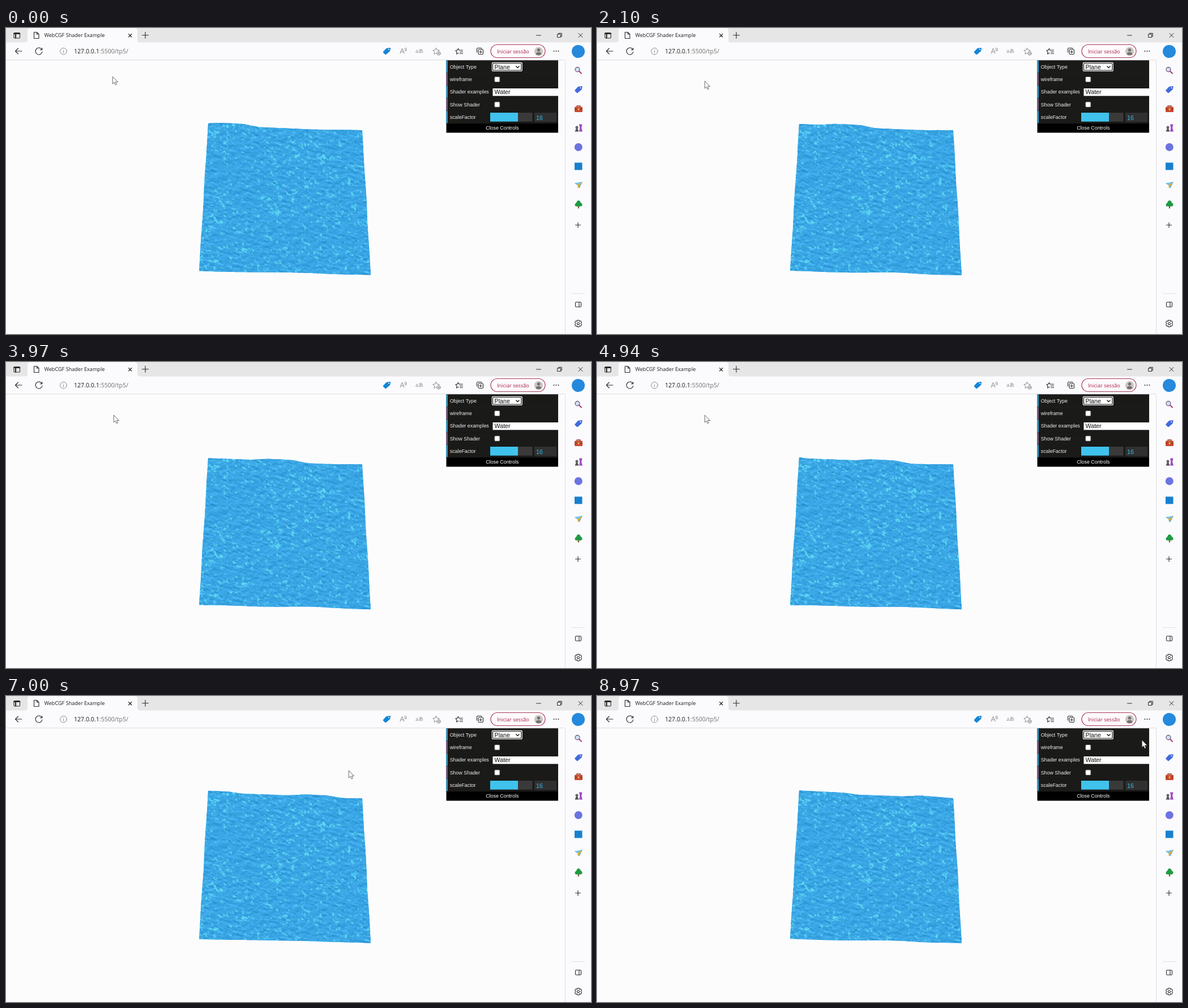
Write an HTML page with a canvas that moves like this. It is 1033 px wide and 542 px high and loops after 9000 ms.

```html
<!DOCTYPE html>
<html lang="en">
<head>
<meta charset="utf-8">
<title>WebCGF Shader Example</title>
<style>
html, body { margin: 0; width: 100%; height: 100%; overflow: hidden; background: #fcfcfd; }
canvas { position: absolute; left: 330px; top: 155px; }
svg { position: absolute; left: 0; top: 0; }
.ui { font: 9.1px "Open Sans", "Noto Sans", sans-serif; fill: #1c1c1c; }
.gui { font: 8.9px "Liberation Sans", Arial, sans-serif; fill: #eee; }
.field { font-size: 10.7px; fill: #111; }
.line { fill: none; stroke: #2b2b2b; stroke-width: 1.1; stroke-linecap: round; stroke-linejoin: round; }
.soft { stroke: #8a8a8a; stroke-width: 1; }
</style>
</head>
<body>
<canvas id="water" width="325" height="295"></canvas>
<svg width="1033" height="542" viewBox="0 0 1033 542">
  <!-- tab strip -->
  <rect width="1033" height="26" fill="#e6e6e7"/>
  <path d="M33 26Q38 26 38 21V5Q38 0 43 0H227Q232 0 232 5V21Q232 26 237 26Z" fill="#fbfbfd"/>
  <rect y="25.5" width="1033" height="31.5" fill="#fbfbfd"/>
  <path d="M0 56.7H987" stroke="#dcdce0"/>
  <g class="line">
    <rect x="14" y="8.5" width="10.5" height="9.5" rx="1.5"/>
    <path d="M14 10H24.5M17 10.5V17.5" stroke-width="2"/>
    <path d="M49.5 7.5H54.5L58 11V18.5H49.5ZM54.5 7.5V11H58"/>
    <path d="M216.5 10.5L222 16M222 10.5L216.5 16M240.5 12.7H251.5M246 7.2V18.2"/>
    <path d="M936.5 13H944.5M1011 9.5L1018 16.5M1018 9.5L1011 16.5" stroke-width="1"/>
    <path d="M974 11H979.5V16.5H974ZM975.5 11V9.3H981.3V15H979.5" stroke-width="1"/>
    <path d="M28 41H16.5M21.5 36L16.5 41L21.5 46"/>
    <path d="M63.5 38.5A6 6 0 1 0 64 42M63.8 35.5V38.8H60.4"/>
  </g>
  <g class="line soft">
    <circle cx="101.5" cy="41.2" r="5.8"/>
    <path d="M101.5 40.5V44M101.5 38.3V38.4"/>
    <path d="M696 45L699.5 36L703 45M697.2 42H701.8M704 36Q706 38 704.5 40.5M706 35Q708.5 38 706.5 41"/>
    <path d="M759.5 35.5L761.3 39L765.2 39.6L762.4 42.4L763 46.3L759.5 44.5L756 46.3L756.6 42.4L753.8 39.6L757.7 39Z"/>
    <circle cx="764" cy="45" r="3.2" fill="#fbfbfd"/>
    <path d="M762.5 45H765.5M764 43.5V46.5"/>
  </g>
  <text class="ui" x="723" y="44" style="fill:#888">aあ</text>
  <g class="line">
    <path d="M798.5 36.5L796.8 39.4L793.8 40L796 42.4L795.5 46L799 44.3M798.5 36.5L800 39.2H806.5M801.5 42.3H806.5M801.5 45.2H806.5"/>
    <path d="M831.5 43V37Q831.5 35.5 833 35.5H838.5Q840 35.5 840 37"/>
    <rect x="834" y="38" width="8.5" height="8.5" rx="1.5"/>
    <path d="M836 42.2H840.5M838.2 40V44.5"/>
  </g>
  <g fill="#333"><circle cx="967.5" cy="41" r="1"/><circle cx="971.5" cy="41" r="1"/><circle cx="975.5" cy="41" r="1"/></g>
  <g id="tag"><path d="M666 42L671.5 36L678 35Q679.5 35 679 37L678 41L671 47Q670 47.5 669 46.5L666 43.5Z" fill="#1485d8"/><circle cx="676" cy="38" r="1" fill="#fff"/></g>
  <rect x="856" y="29.5" width="96" height="23" rx="11.5" fill="#fffafc" stroke="#a63a58" stroke-width="1.2"/>
  <circle cx="940.5" cy="41.5" r="7.7" fill="#c9c6c3"/>
  <circle cx="940.5" cy="39" r="2.7" fill="#77716d"/><path d="M935.5 46.5Q936 42.8 940.5 42.8T945.5 46.5Q940.5 50 935.5 46.5Z" fill="#77716d"/>
  <g class="ui">
    <text x="67.5" y="16.4">WebCGF Shader Example</text>
    <text x="120" y="45" style="font-size:10.6px">127.0.0.1<tspan fill="#707070">:5500/tp5/</tspan></text>
    <text x="867" y="44.5" style="fill:#a3224a">Iniciar sessão</text>
  </g>
  <!-- side bar -->
  <rect x="987" y="57" width="46" height="485" fill="#fbfbfd"/>
  <path d="M987.5 57V542M999 470.5H1022" stroke="#dfdfe3"/>
  <circle cx="1010.5" cy="41.5" r="11.5" fill="#2589dc"/>
  <circle cx="1009" cy="73.5" r="4" fill="#cfe3f3" stroke="#775a83" stroke-width="1.3"/>
  <path d="M1012 76.5L1016 80.5" stroke="#a83c72" stroke-width="2" stroke-linecap="round"/>
  <g transform="translate(338.5 68)"><path d="M666 42L671.5 36L678 35Q679.5 35 679 37L678 41L671 47Q670 47.5 669 46.5L666 43.5Z" fill="#416bdc"/><circle cx="676" cy="38" r="1" fill="#fff"/></g>
  <path d="M1008 140V138H1014V140" fill="none" stroke="#8d3928" stroke-width="1.3"/>
  <rect x="1004" y="139.5" width="14" height="9.5" rx="1.5" fill="#c74b31"/><path d="M1004 144H1018" stroke="#812c22"/><rect x="1009.5" y="142.5" width="3" height="3" fill="#efb457"/>
  <path d="M1004.5 183.5L1006.8 178H1009.2L1011.5 183.5Z" fill="#555"/><circle cx="1008" cy="176" r="2.5" fill="#666"/>
  <path d="M1012 183.5L1013.3 177L1012 170.5H1017.5L1016.2 177L1018 183.5Z" fill="#a04cc4"/>
  <circle cx="1010.8" cy="211" r="7" fill="#6d73df"/>
  <rect x="1004" y="238.5" width="13.5" height="13" fill="#1880ce"/>
  <path d="M1004 275L1018 272.5L1012 284L1010 279Z" fill="#2f9be3"/><path d="M1004 275L1018 272.5L1009 278Z" fill="#72c8f5"/><path d="M1009 278L1018 272.5L1010 284Z" fill="#e8ad36"/>
  <rect x="1009.8" y="314" width="2.4" height="5.5" fill="#8b5a35"/><path d="M1011 305.5Q1014 305.5 1014.5 309Q1018 311 1017.5 314Q1017 316 1014 316H1008Q1004.5 316 1004.5 313.5Q1004.5 311 1007.5 309Q1008 305.5 1011 305.5Z" fill="#1f9a45"/>
  <g class="line">
    <path d="M1005.5 349H1014.5M1010 344.5V353.5"/>
    <rect x="1005.5" y="485.5" width="10" height="8.5" rx="1.5"/><path d="M1012 485.5V494"/>
    <circle cx="1010.5" cy="523.5" r="2"/>
    <path d="M1009 517.5H1012L1012.6 519.5L1014.8 518.8L1016.5 521.5L1015 523.5L1016.5 525.5L1014.8 528.2L1012.6 527.5L1012 529.5H1009L1008.4 527.5L1006.2 528.2L1004.5 525.5L1006 523.5L1004.5 521.5L1006.2 518.8L1008.4 519.5Z"/>
  </g>
  <!-- control panel -->
  <rect x="777.5" y="57.5" width="197.5" height="128" fill="#000"/>
  <g id="rows" class="gui"></g>
  <g class="gui">
    <rect x="857.8" y="60.8" width="54" height="16" rx="2" fill="#fff"/>
    <rect x="859.5" y="62.5" width="50.5" height="12.5" rx="1" fill="#fff" stroke="#111" stroke-width="1.2"/>
    <text class="field" x="862.5" y="72.7">Plane</text>
    <path d="M900.5 67.5L903.5 70.5L906.5 67.5" fill="none" stroke="#111" stroke-width="1.3"/>
    <rect x="859.5" y="107" width="115.5" height="13.3" fill="#fff"/>
    <text class="field" x="862.5" y="117.3">Water</text>
    <g fill="#fff" stroke="#777" stroke-width=".8"><rect x="862.8" y="86.5" width="9" height="9" rx="1.5"/><rect x="862.8" y="131" width="9" height="9" rx="1.5"/></g>
    <rect x="855" y="150" width="74.5" height="15.7" fill="#3a3a3a"/>
    <rect x="855" y="150" width="49" height="15.7" fill="#3fc3ed"/>
    <rect x="933" y="150" width="39" height="16.5" fill="#303030"/>
    <text class="field" x="936" y="162.7" style="fill:#3db9e2">16</text>
    <text x="847.2" y="180.2" style="fill:#fff">Close Controls</text>
  </g>
  <path id="cursor" d="M.3 0V13L3.2 10.3L5.2 14.8L7.3 13.9L5.4 9.6H9.5Z" fill="#fff" stroke="#444" stroke-width=".8"/>
</svg>
<script>
const LOOP = 9000, LEFT = 330, TOP = 155;
const canvas = document.getElementById('water'), ctx = canvas.getContext('2d');
const cursor = document.getElementById('cursor');
const mix = (a, b, k) => a + (b - a) * k;
const smooth = (a, b, x) => { const k = Math.min(1, Math.max(0, (x - a) / (b - a))); return k * k * (3 - 2 * k); };

// Eased value of column c at position p in a list of stops
function track(stops, p, c = 1) {
  const i = stops.findIndex(s => s[0] > p);
  if (i < 1) return stops[i < 0 ? stops.length - 1 : 0][c];
  const a = stops[i - 1], b = stops[i];
  return mix(a[c], b[c], smooth(a[0], b[0], p));
}

document.getElementById('rows').innerHTML =
  ['Object Type', 'wireframe', 'Shader examples', 'Show Shader', 'scaleFactor'].map((label, i) => {
    const y = 57.5 + i * 22.3;
    return `<rect x="777.5" y="${y}" width="197.5" height="21.7" fill="#1a1a18"/>
      <path d="M777.5 ${y + 22}H975" stroke="#2c2c2c" stroke-width=".7"/>
      <rect x="777.5" y="${y}" width="2.4" height="21.7" fill="${i % 2 ? '#7d5f86' : '#2fa6d8'}"/>
      <text x="783.7" y="${y + 14.2}">${label}</text>`;
  }).join('');

// Seeded value noise
function hash(x, y) {
  let h = Math.imul(x, 374761393) + Math.imul(y, 668265263);
  h = Math.imul(h ^ h >>> 13, 1274126177);
  return ((h ^ h >>> 16) >>> 0) / 4294967296;
}
function noise(x, y) {
  const i = Math.floor(x), j = Math.floor(y), u = smooth(0, 1, x - i), v = smooth(0, 1, y - j);
  return mix(mix(hash(i, j), hash(i + 1, j), u), mix(hash(i, j + 1), hash(i + 1, j + 1), u), v);
}
const ripple = (x, y) => noise(x / 8, y / 4.5) + .6 * noise(x / 3.6 + 40, y / 2.5 + 9);
const sparkle = (x, y) => .6 * noise(x / 5.5 + 70, y / 3.4 + 30) + .4 * noise(x / 2.6 + 11, y / 2.1 + 83);

function makeTexture() {
  const tex = document.createElement('canvas'), w = tex.width = canvas.width, h = tex.height = canvas.height;
  const c = tex.getContext('2d'), img = c.createImageData(w, h);
  const base = [58, 165, 228], glint = [100, 226, 246];
  for (let row = 0, p = 0; row < h; row++) for (let x = 0; x < w; x++, p += 4) {
    const y = row - x * .28;
    const shade = 32 * (ripple(x, y + 1) - ripple(x - .7, y - 1));
    const light = .85 * smooth(.6, .86, sparkle(x, y) + .12 * (noise(x / 30, row / 24) - .5));
    base.forEach((v, i) => img.data[p + i] = mix(v + shade, glint[i], light));
    img.data[p + 3] = 255;
  }
  c.putImageData(img, 0, 0);
  return tex;
}
const texture = makeTexture();

// Swell profile: distance from the moving crest, height
const profile = [[-290, -2], [-195, -1.5], [-165, 1], [-90, .6], [-52, -2.3], [-20, -2.2], [20, 2.4], [100, 2.4], [200, 1]];
function swell(x, v, t) {
  const back = track(profile, x - 432 - .0217 * t) * (1 - .8 * smooth(560, 629, x));
  const front = -1.5 * Math.exp(-(((x - 528) / 45) ** 2)) + .4 * Math.sin(x / 27 - t / 1250);
  return mix(back, front, v);
}
function surface(u, v, t) {
  const x = mix(mix(357, 629, u), mix(341, 644, u), v);
  const y = mix(mix(169.3, 181, u), mix(430.3, 437.8, u), v);
  const sway = .4 * Math.sin(v * 13 - t / 1250 + u * 2) * Math.sin(v * Math.PI);
  return [x + sway - LEFT, y + swell(x, v, t) - TOP];
}

function drawWater(t) {
  const steps = 60, strip = 3;
  ctx.clearRect(0, 0, canvas.width, canvas.height);
  ctx.save();
  ctx.beginPath();
  for (let side = 0; side < 4; side++) for (let i = 0; i < steps; i++) {
    const k = i / steps;
    ctx.lineTo(...surface(...[[k, 0], [1, k], [1 - k, 1], [0, 1 - k]][side], t));
  }
  ctx.clip();
  ctx.drawImage(texture, 0, 0);
  for (let x = 0; x < canvas.width; x += strip)
    ctx.drawImage(texture, x, 0, strip, canvas.height, x, .5 * swell(x + LEFT, .5, t), strip, canvas.height);
  ctx.strokeStyle = 'rgba(75,80,180,.4)';
  ctx.lineWidth = .8;
  ctx.beginPath();
  ctx.moveTo(167, 125);
  ctx.lineTo(162, 144);
  ctx.stroke();
  ctx.restore();
}

// Pointer stops: time, x, y
const path = [
  [0, 188, 86], [250, 188, 86], [1000, 286, 219], [1350, 286, 219], [1850, 195, 97], [2000, 190, 94],
  [4970, 190, 94], [5600, 605, 133], [7250, 605, 132], [8000, 975, 68], [8450, 972, 70], [8750, 962, 78]
];

function frame() {
  const t = performance.now() % LOOP;
  drawWater(t);
  cursor.setAttribute('transform', `translate(${track(path, t, 1)} ${track(path, t, 2)})`);
  requestAnimationFrame(frame);
}
frame();
</script>
</body>
</html>
```
